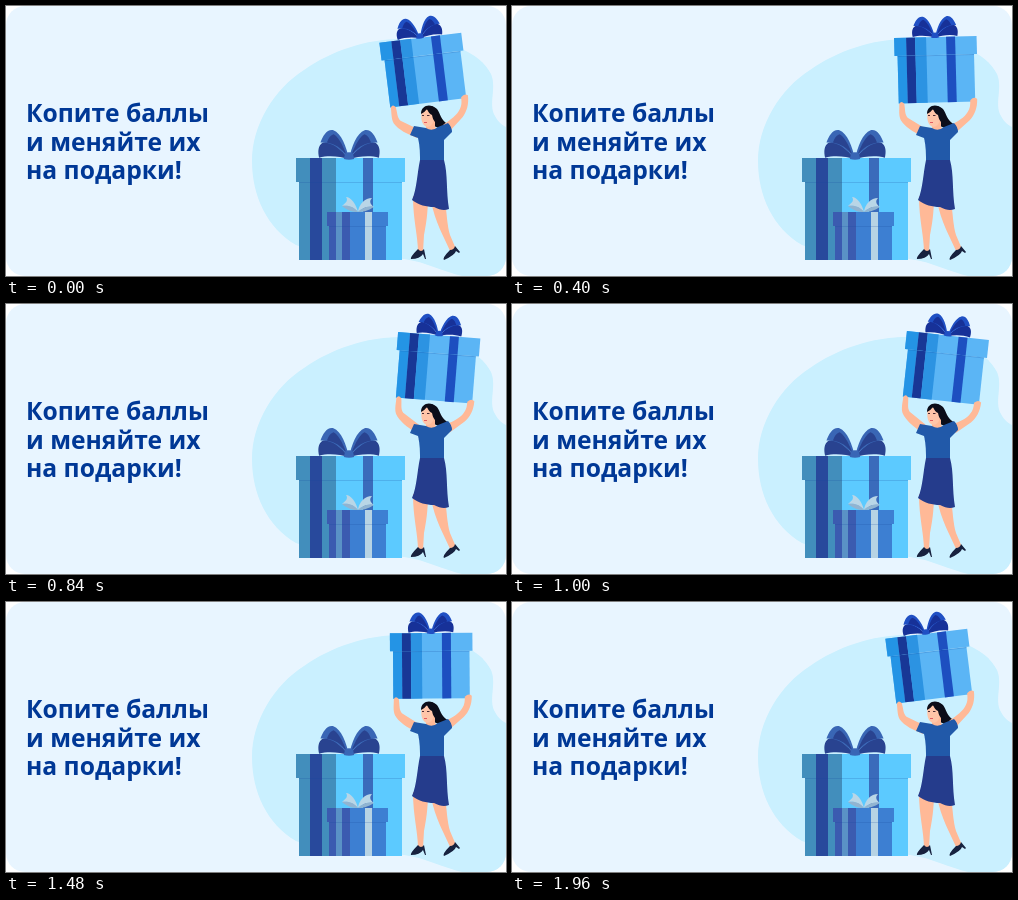
Animation of 500 by 270 pixels, one loop 2 s. Source, as an HTML page:

```html
<!DOCTYPE html>
<html lang="ru">
<head>
<meta charset="utf-8">
<title>Подарки</title>
<style>
  html, body { margin: 0; width: 100%; height: 100%; overflow: hidden; background: #fff; }
  svg { display: block; width: 100vw; height: 100vh; }
  text { font: 700 24.65px "Open Sans", "Noto Sans", sans-serif; fill: #003896; }
</style>
</head>
<body>
<svg viewBox="0 0 500 270" xmlns="http://www.w3.org/2000/svg">
  <defs>
    <clipPath id="card"><rect width="500" height="270" rx="19"/></clipPath>
    <g id="loop">
      <path fill="var(--fold)" d="M0 0C-7-8-14-14-20-12C-24-10-24-5-23-1C-16-3-7-2 0 0Z"/>
      <path fill="var(--loop)" d="M0 0C-2-9-6-19-12-21C-17-22-20-17-22-12C-14-13-7-8 0 0Z"/>
      <path fill="var(--fold)" d="M-2-3C-5-11-9-17-12-18C-15-17-16-14-17-12C-11-11-6-8-2-3Z"/>
    </g>
    <g id="bow">
      <use href="#loop"/>
      <use href="#loop" transform="scale(-1 1)"/>
      <path fill="var(--loop)" d="M-3-4Q0-6 3-4L4 0Q0 1-4 0Z"/>
    </g>
  </defs>
  <g clip-path="url(#card)">
    <rect width="500" height="270" fill="#e8f5ff"/>
    <path fill="#caf0ff" d="M246 155C246 119 268 83 298 64C325 45 360 33 395 33C438 32 474 45 485 68C491 82 482 98 489 110C492 116 496 119 500 121V270H456C438 266 420 256 398 253C360 249 320 251 290 239C261 222 246 190 246 155Z"/>
    <text x="20" y="115.7">Копите баллы</text>
    <text x="20" y="144.5">и меняйте их</text>
    <text x="20" y="173.3">на подарки!</text>

    <g id="large"></g>
    <use href="#bow" style="--loop:#3966b5;--fold:#294390" transform="translate(343 153) scale(1.3 1.37)"/>
    <g id="small"></g>
    <g fill="#b9d6e7">
      <path d="M352 206C350 198 345 191 340 191C342 194 341 196 336 200C343 199 348 202 352 206Z"/>
      <path d="M352 206C353 198 359 192 366 192C363 195 364 198 368 201C361 200 356 202 352 206Z"/>
      <path fill="#91b4d1" d="M352 206C348 201 344 199 336 200C342 205 347 206 352 206C357 206 362 205 368 201C360 200 356 202 352 206Z"/>
    </g>

    <path fill="#ffb997" d="M407 190H422C422 207 420 219 418 229L417 246H412C412 230 407 214 407 190Z"/>
    <path fill="#ffb997" d="M425 195H439C441 208 441 219 444 229L450 243L445 247C438 231 429 216 425 195Z"/>
    <path fill="#17223f" d="M412 243Q415 247 418 243L420 253H419L417 248Q414 253 405 253Q404 251 412 243Z"/>
    <path fill="#17223f" d="M444 244Q448 244 449 240L454 246L453 247L450 245Q449 249 438 254Q436 252 444 244Z"/>
    <path fill="#0b0d19" d="M416 106C417 99 426 98 431 103C435 108 434 114 443 119C440 123 433 124 427 119Z"/>
    <g id="lift">
      <g id="held"></g>
      <use href="#bow" style="--loop:#2050c4;--fold:#173198" transform="translate(425.5 31.5) scale(.97 1)"/>
      <g fill="#ffb997">
        <path d="M388 97Q390 93 393 97C394 104 393 107 396 111L413 122L410 130C401 125 393 120 389 113C387 108 388 103 388 97Z"/>
        <path d="M459 95Q463 91 466 94C466 103 463 110 458 115L444 127L438 120C446 116 453 112 456 107C459 103 459 99 459 95Z"/>
      </g>
    </g>
    <path fill="#ffb997" d="M420 114H429V121Q432 124 431 127H420Z"/>
    <path fill="#2159a9" d="M408 120L420 122Q426 126 432 121L442 117Q446 121 446 126L438 134L438 157H414C414 148 414 140 412 132L404 129Z"/>
    <path fill="#253c8c" d="M414 154H438C442 168 440 185 443 203C438 205 434 204 428 201C420 201 413 199 406 194C411 182 411 168 414 154Z"/>
    <path fill="#ffc5a8" d="M416 104Q422 102 427 106L428 114Q426 121 421 121C416 120 414 112 416 104Z"/>
    <path fill="#0b0d19" d="M415 108C415 99 425 97 430 103C434 107 433 115 431 118Q427 115 426 109Q423 108 421 103Q419 106 415 108Z"/>
    <path d="M416 109.5h2M421 109.5h2.5" stroke="#4b2d35" fill="none"/>
    <path d="M418 116.5h3" stroke="#e35d62" fill="none"/>
  </g>
</svg>
<script>
const LOOP = 2000, STEP = 40;
const byId = id => document.getElementById(id);
const lift = byId('lift');

// Bands are [start, end, colour], measured across the lid.
function drawBox(id, x, y, width, lidHeight, height, inset, bands) {
  const rect = (left, right, top, h, fill) =>
    `<rect x="${left}" y="${top}" width="${right - left}" height="${h}" fill="${fill}"/>`;
  const lid = bands.map(([a, b, fill]) => rect(x + a, x + b, y, lidHeight, fill)).join('');
  const body = bands.map(([a, b, fill]) =>
    rect(x + Math.max(a, inset), x + Math.min(b, width - inset), y + lidHeight, height - lidHeight, fill)).join('');
  const shade = rect(x + inset, x + width - inset, y + lidHeight, 1, '#17469b33');
  byId(id).innerHTML = lid + body + shade;
}

drawBox('large', 290, 152, 109, 24, 102, 3, [
  [0, 109, '#5ccaff'], [0, 14, '#428ebc'], [14, 26, '#28499c'], [26, 40, '#428ebc'], [67, 77, '#3a6bbb']
]);
drawBox('small', 321, 206, 61, 14, 48, 2, [
  [0, 61, '#3d7fd2'], [0, 9, '#3b5bb0'], [9, 15, '#5a92c6'], [15, 23, '#3b5bb0'], [38, 45, '#b7d3e4']
]);
drawBox('held', 384.5, 31, 82.5, 18, 65.5, 3, [
  [0, 82.5, '#5bb5f5'], [0, 12, '#2494e5'], [12, 21, '#183796'], [21, 32, '#2c93e2'], [52, 61, '#1d4fc0']
]);

function render(time) {
  const t = Math.floor((time % LOOP) / STEP) * STEP;
  const half = (LOOP - STEP) / 2;
  const swing = 1 - Math.abs(t - half) / half;
  lift.setAttribute('transform', `rotate(${-7 + 13.5 * swing} 426 125)`);
}

function tick() {
  render(performance.now());
  requestAnimationFrame(tick);
}
tick();
</script>
</body>
</html>
```
